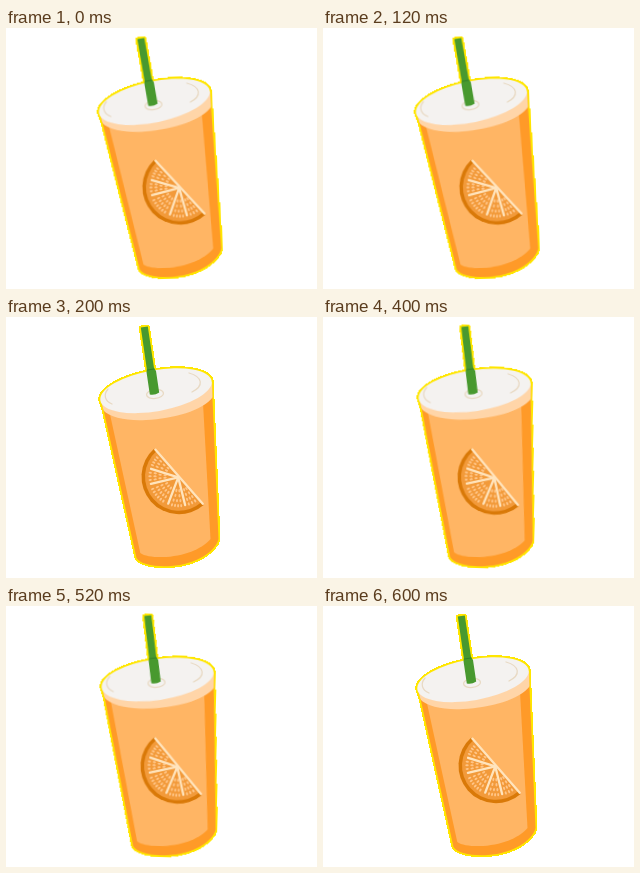
An HTML page for the animation above (800 ms loop, 311 by 261 pixels).

```html
<!DOCTYPE html>
<html lang="en">
<head>
<meta charset="utf-8">
<title>Orange juice</title>
<style>
  html, body { margin: 0; width: 100%; height: 100%; overflow: hidden; background: #fff; }
  svg { display: block; width: 311px; height: 261px; }
  #drink { transform-origin: 155px 128px; }
  .line { fill: none; stroke-linecap: round; stroke-linejoin: round; }
</style>
</head>
<body>
<svg viewBox="0 0 311 261">
  <defs>
    <ellipse id="lid" cx="150" cy="73.700" rx="56.500" ry="20.500" transform="rotate(-10 150 73.700)"/>
    <path id="cup" d="M94.500 82 L206 65 L206.500 82 L212.500 222 C210 234 190 247.500 165 249 C148 250 134 247 130.500 241 L98 95 Z"/>
    <path id="straw" d="M134.800 10.500 L141.800 9.500 L148 51 L150 54 L153.200 75.500 Q149 78.500 143.800 77.500 L140.500 55 L140.800 52 Z"/>
    <clipPath id="inside"><use href="#cup"/></clipPath>
  </defs>
  <g id="drink">
    <g class="line" stroke="#ffe600" stroke-width="4" shape-rendering="crispEdges">
      <use href="#cup"/><use href="#lid"/><use href="#straw"/>
    </g>

    <use href="#cup" fill="#ff9a28"/>
    <g clip-path="url(#inside)">
      <path fill="#ffb564" d="M103.700 96 L197 86 L204.500 222 C198 230 182 238.500 160 240 C149 240.500 139 239.500 134.300 236 Z"/>
      <path fill="#ffd5a8" d="M90 82 L210 60 L207 80 C196 94 168 101.500 140 103 C122 104 104 101 97 93 Z"/>
    </g>
    <use href="#lid" fill="#f4f2f0"/>
    <g class="line" stroke="#e8d9c3" stroke-width="1.300">
      <path d="M183 56 C197 60 198 69 186 75"/>
      <path d="M102 72 C97 78 99 84 106 87"/>
      <ellipse cx="149" cy="77" rx="8.500" ry="4.500" transform="rotate(-6 149 77)"/>
    </g>
    <use href="#straw" fill="#48992f"/>
    <path class="line" stroke="#35802a" stroke-width="1.200" d="M141.500 53 L148 52"/>

    <g id="slice" transform="translate(173 159.700) rotate(48.800)">
      <path fill="#d97908" d="M-37.500 0 A37.500 37.500 0 0 0 37.500 0 Z"/>
      <path fill="#f29a3a" d="M-34 0 A34 34 0 0 0 34 0 Z"/>
      <g id="pulp" fill="#ffc587"></g>
      <g id="spokes" class="line" stroke="#ffe4bd" stroke-width="2.300">
        <path d="M-36 0 L36 0"/>
      </g>
    </g>
  </g>
</svg>
<script>
  const NS = 'http://www.w3.org/2000/svg';
  const add = (id, tag, attrs) => {
    const el = document.createElementNS(NS, tag);
    for (const k in attrs) el.setAttribute(k, attrs[k]);
    document.getElementById(id).append(el);
  };
  const rad = deg => deg * Math.PI / 180;
  const polar = (r, deg) => [r * Math.cos(rad(deg)), r * Math.sin(rad(deg))];

  const cuts = [0, 29, 63, 117, 147, 180];
  for (const deg of cuts.slice(1, -1)) {
    const [x, y] = polar(29, deg);
    add('spokes', 'path', { d: `M0 1 L${x} ${y}` });
  }
  // Juice cells fill each wedge in arcs, more of them towards the rind
  for (let w = 0; w + 1 < cuts.length; w++) {
    const span = cuts[w + 1] - cuts[w];
    for (let r = 14; r < 32; r += 5) {
      const n = Math.max(1, Math.round(r * rad(span) / 4.6));
      for (let j = 0; j < n; j++) {
        const deg = cuts[w] + span * (0.14 + 0.72 * (j + 0.5) / n);
        const [x, y] = polar(r, deg);
        add('pulp', 'ellipse', {
          cx: x, cy: y, rx: 1.7, ry: 1, transform: `rotate(${deg} ${x} ${y})`
        });
      }
    }
  }

  const angles = [-1.7, 0, 1.7, 0];
  const frames = angles.map((a, i) => ({
    transform: `rotate(${a}deg)`, offset: i / angles.length, easing: 'steps(1, end)'
  }));
  frames.push({ transform: `rotate(${angles[0]}deg)`, offset: 1 });
  document.getElementById('drink').animate(frames, { duration: 800, iterations: Infinity });
</script>
</body>
</html>
```
